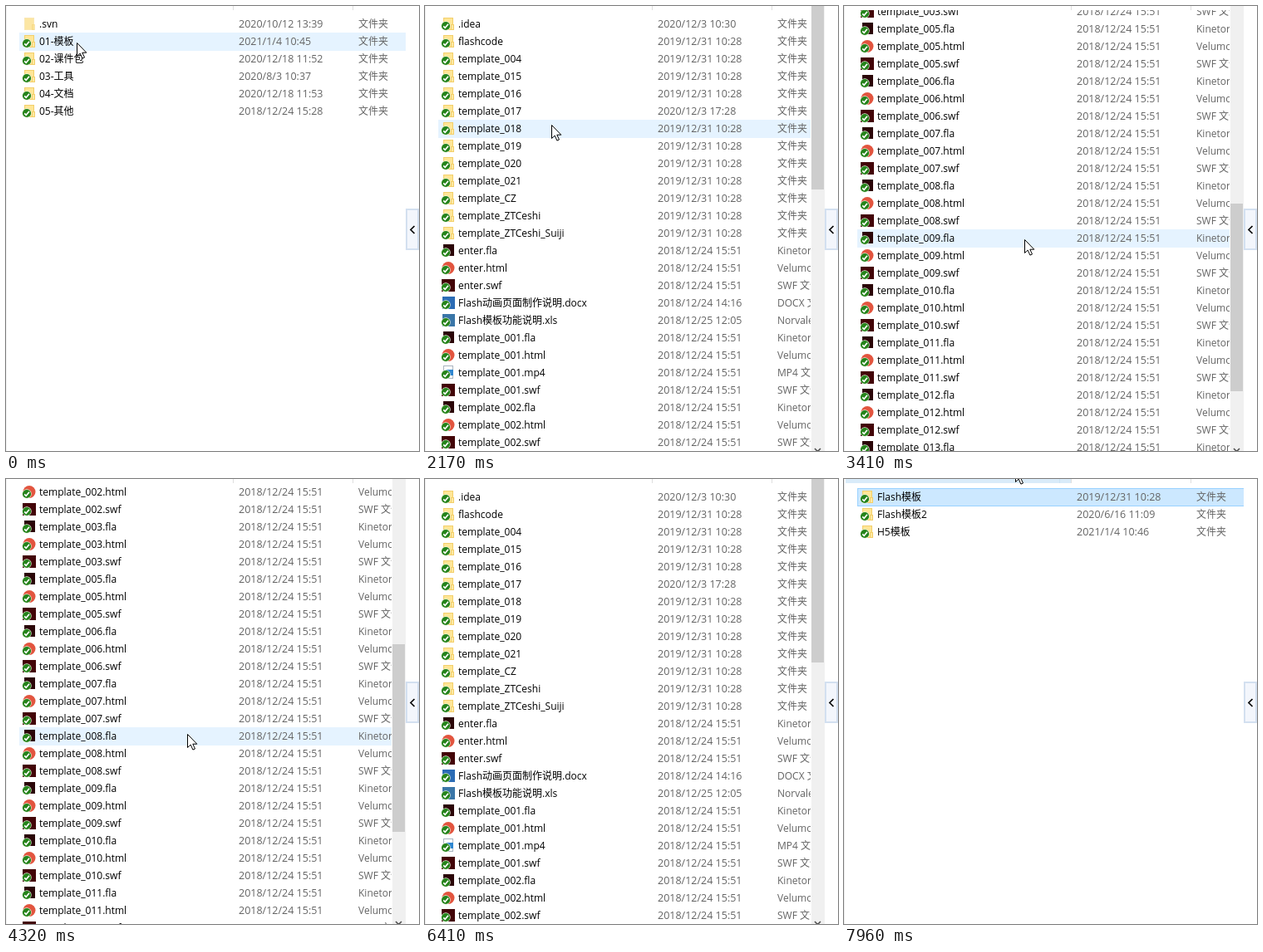
Recreate the animation shown at these times as an HTML page with a canvas. Size 497 by 536 pixels, loop 8 s.

```html
<!DOCTYPE html>
<html lang="zh-CN">
<head>
<meta charset="utf-8">
<title>文件夹</title>
<style>
html, body { margin: 0; width: 100%; height: 100%; overflow: hidden; background: #fff; }
canvas { display: block; }
</style>
</head>
<body>
<canvas id="stage" width="497" height="536"></canvas>
<script>
const ctx = document.getElementById('stage').getContext('2d');
const LOOP = 8000, ROW = 21, TOP = 11;
const FAMILY = '"Open Sans", "Noto Sans CJK SC", "Noto Sans CJK", sans-serif';
const GREY = '#646464';
const TYPES = {
  fla: 'Kinetor Document', html: 'Velumo HTML Document', swf: 'SWF 文件',
  docx: 'DOCX 文件', xls: 'Norvale 97-2003', mp4: 'MP4 文件'
};

const folder = (name, date = '2019/12/31 10:28') => ({ name, date, kind: 'folder', type: '文件夹' });
const file = (name, date = '2018/12/24 15:51') => {
  const kind = name.split('.').pop();
  return { name, date, kind, type: TYPES[kind] };
};

const root = [
  folder('.svn', '2020/10/12 13:39'),
  folder('01-模板', '2021/1/4 10:45'),
  folder('02-课件包', '2020/12/18 11:52'),
  folder('03-工具', '2020/8/3 10:37'),
  folder('04-文档', '2020/12/18 11:53'),
  folder('05-其他', '2018/12/24 15:28')
];
const kits = [
  folder('Flash模板'),
  folder('Flash模板2', '2020/6/16 11:09'),
  folder('H5模板', '2021/1/4 10:46')
];
const files = [
  folder('.idea', '2020/12/3 10:30'),
  folder('flashcode'),
  ...['004', '015', '016', '017', '018', '019', '020', '021', 'CZ', 'ZTCeshi', 'ZTCeshi_Suiji']
    .map(n => folder('template_' + n, n === '017' ? '2020/12/3 17:28' : undefined)),
  ...['fla', 'html', 'swf'].map(e => file('enter.' + e)),
  file('Flash动画页面制作说明.docx', '2018/12/24 14:16'),
  file('Flash模板功能说明.xls', '2018/12/25 12:05')
];
for (let n = 1; n <= 14; n++) {
  if (n === 4) continue;
  const exts = n === 1 ? ['fla', 'html', 'mp4', 'swf'] : ['fla', 'html', 'swf'];
  for (const e of exts) files.push(file(`template_${String(n).padStart(3, '0')}.${e}`));
}

// [time, x, y] of the pointer tip
const pointerKeys = [
  [0, 86, 45], [740, 86, 45], [800, 86, 48], [1020, 82, 20], [2000, 82, 20], [2300, 199, 225],
  [2860, 199, 225], [3500, 219, 285], [3680, 219, 285], [4020, 219, 300], [4150, 219, 300],
  [4310, 219, 308], [4400, 219, 308], [4850, 227, 311], [5960, 227, 311], [6400, 212, -45],
  [6900, 212, -45], [7500, 213, 39], [7860, 213, 39], [7950, 207, -12], [LOOP, 207, -12]
];
// [time, offset] of the long list
const scrollKeys = [
  [0, 0], [2250, 0], [2600, 245], [2800, 245], [3600, 686], [4150, 686],
  [4310, 489], [4400, 489], [4850, 100], [5000, 100], [5090, 0], [LOOP, 0]
];

function at(keys, t, ease = u => u) {
  const i = Math.max(1, keys.findIndex(k => k[0] > t));
  const a = keys[i - 1], b = keys[i];
  const u = ease((t - a[0]) / (b[0] - a[0]));
  return a.slice(1).map((v, j) => v + (b[j + 1] - v) * u);
}
const smooth = u => u * u * (3 - 2 * u);
const within = (t, a, b) => t >= a && t < b;

function rect(x, y, w, h, color) {
  ctx.fillStyle = color;
  ctx.fillRect(x, y, w, h);
}
function disc(x, y, r, color) {
  ctx.fillStyle = color;
  ctx.beginPath();
  ctx.arc(x, y, r, 0, 7);
  ctx.fill();
}
function line(points, color, width) {
  ctx.strokeStyle = color;
  ctx.lineWidth = width;
  ctx.beginPath();
  points.forEach(p => ctx.lineTo(...p));
  ctx.stroke();
}
function text(s, x, y, color, size = 12) {
  ctx.font = `${size}px ${FAMILY}`;
  ctx.fillStyle = color;
  ctx.fillText(s, x, y);
}
function clipped(x, y, w, h, paint) {
  ctx.save();
  ctx.beginPath();
  ctx.rect(x, y, w, h);
  ctx.clip();
  paint();
  ctx.restore();
}

function icon({ kind, name }, y) {
  const plain = name === '.svn';
  if (kind === 'folder') {
    ctx.globalAlpha = plain ? 0.5 : 1;
    rect(22, y + 3, 12, 15, '#f3cf6b');
    rect(23, y + 4, 10, 13, '#ffe696');
    rect(31, y + 11, 4, 7, '#f3cf6b');
    rect(32, y + 12, 2, 5, '#ffe9a2');
    ctx.globalAlpha = 1;
  } else if (kind === 'html') disc(28, y + 10.5, 7.5, '#e2553f');
  else if (kind === 'fla') rect(22, y + 3, 13, 14, '#2b0608');
  else if (kind === 'swf') rect(20, y + 3, 16, 15, '#430508');
  else if (kind === 'mp4') {
    rect(22, y + 2, 12, 16, '#a9b4bf');
    rect(23, y + 3, 10, 14, '#fff');
    rect(25, y + 7, 9, 7, '#2f86d0');
  } else rect(21, y + 3, 15, 15, kind === 'docx' ? '#2b6cb5' : '#3a76a8');
  if (plain) return;
  disc(25, y + 13, 5.7, '#e8f3e2');
  disc(25, y + 13, 5.1, '#25831a');
  line([[22.2, y + 13.3], [24.2, y + 15.3], [28, y + 10.8]], '#fff', 1.7);
}

function list(rows, scroll, right, hover, selected) {
  clipped(0, 5, right, 531, () => rows.forEach((row, i) => {
    const y = TOP + i * ROW - scroll;
    if (y < -ROW || y > 536) return;
    if (i === selected) {
      rect(16, y, 480, 22, '#99d1ff');
      rect(17, y + 1, 479, 20, '#cce8ff');
    } else if (i === hover) rect(16, y, 480, 22, '#e5f3ff');
    icon(row, y);
    text(row.name, 40, y + 15, '#000');
    text(row.date, 280, y + 15, GREY, 12.5);
    text(row.type, 424, y + 15, GREY);
  }));
}

function scrollbar(scroll) {
  rect(465, 0, 16, 536, '#f0f0f0');
  rect(465, Math.round(scroll * 0.417 - 5), 15, 226, '#cdcdcd');
  line([[469, 533], [472.5, 536.5], [476, 533]], '#505050', 1.6);
}

function tooltip(x, y, type, size) {
  const rows = ['类型: ' + type, '大小: ' + size, '修改日期: 2018/12/24 15:51'];
  ctx.font = `12.4px ${FAMILY}`;
  const w = Math.round(Math.max(...rows.map(s => ctx.measureText(s).width))) + 12;
  rect(x + 4, y + 4, w, 56, 'rgba(0,0,0,.15)');
  rect(x + 2, y + 2, w, 56, 'rgba(0,0,0,.3)');
  rect(x, y, w, 56, '#767676');
  rect(x + 1, y + 1, w - 2, 54, '#fff');
  rows.forEach((s, i) => text(s, x + 6, y + 15 + i * 17, '#575757', 12.4));
}

function sideTab() {
  rect(481, 244, 16, 50, '#d3e0f0');
  rect(483, 246, 12, 46, '#f3f6fc');
  line([[491.5, 265], [487, 269.5], [491.5, 274]], '#000', 1.7);
}

const arrow = new Path2D('M0 0V16L3.7 12.6L6.4 18.6L9 17.5L6.3 11.7H11.3Z');
function pointer(x, y) {
  ctx.save();
  ctx.translate(Math.round(x) - 0.5, Math.round(y) - 0.5);
  ctx.fillStyle = '#fff';
  ctx.fill(arrow);
  ctx.strokeStyle = '#000';
  ctx.lineWidth = 1;
  ctx.stroke(arrow);
  ctx.restore();
}

// Folder on show, null while the view reloads
function viewAt(t) {
  if (t < 380) return root;
  if (t < 470) return null;
  if (t < 1480) return kits;
  if (t < 1630) return null;
  if (t < 6810) return files;
  return t < 6890 ? null : kits;
}

function draw(t) {
  const [px, py] = at(pointerKeys, t, smooth);
  const scroll = Math.round(at(scrollKeys, t)[0]);
  const rows = viewAt(t);
  const long = rows === files;
  const quiet = within(t, 470, 550) || within(t, 1630, 1880);
  const hover = quiet || py < TOP ? -1 : Math.floor((py + scroll - TOP) / ROW);
  const selected = within(t, 80, 380) ? 1 : within(t, 1170, 1480) || t >= 6890 ? 0 : -1;

  rect(0, 0, 497, 536, '#fff');
  rect(0, 0, 1, 536, '#f1f1f1');
  if (py < 5 && py > -26) {
    rect(2, 0, 272, 5, '#d9ebf9');
    rect(259, 0, 1, 5, '#cbe2f4');
  }
  rect(273, 0, 1, 5, '#dedede');
  rect(417, 0, 1, 5, '#dedede');

  if (rows) list(rows, scroll, long ? 464 : 481, hover, selected);
  if (long) scrollbar(scroll);
  sideTab();

  if (within(t, 2640, 2800)) tooltip(195, 231, TYPES.swf, '864 KB');
  if (within(t, 5720, 6020)) tooltip(227, 331, TYPES.html, '3.35 KB');
  if (within(t, 80, 380) || within(t, 1170, 1480)) {
    const age = t < 400 ? t - 80 : t - 1170;
    disc(px, py, 7 + 4 * Math.min(1, age / 140), 'rgba(234,234,20,.62)');
  }
  pointer(px, py);
}

function frame(now) {
  draw(now % LOOP);
  requestAnimationFrame(frame);
}
requestAnimationFrame(frame);
</script>
</body>
</html>
```
